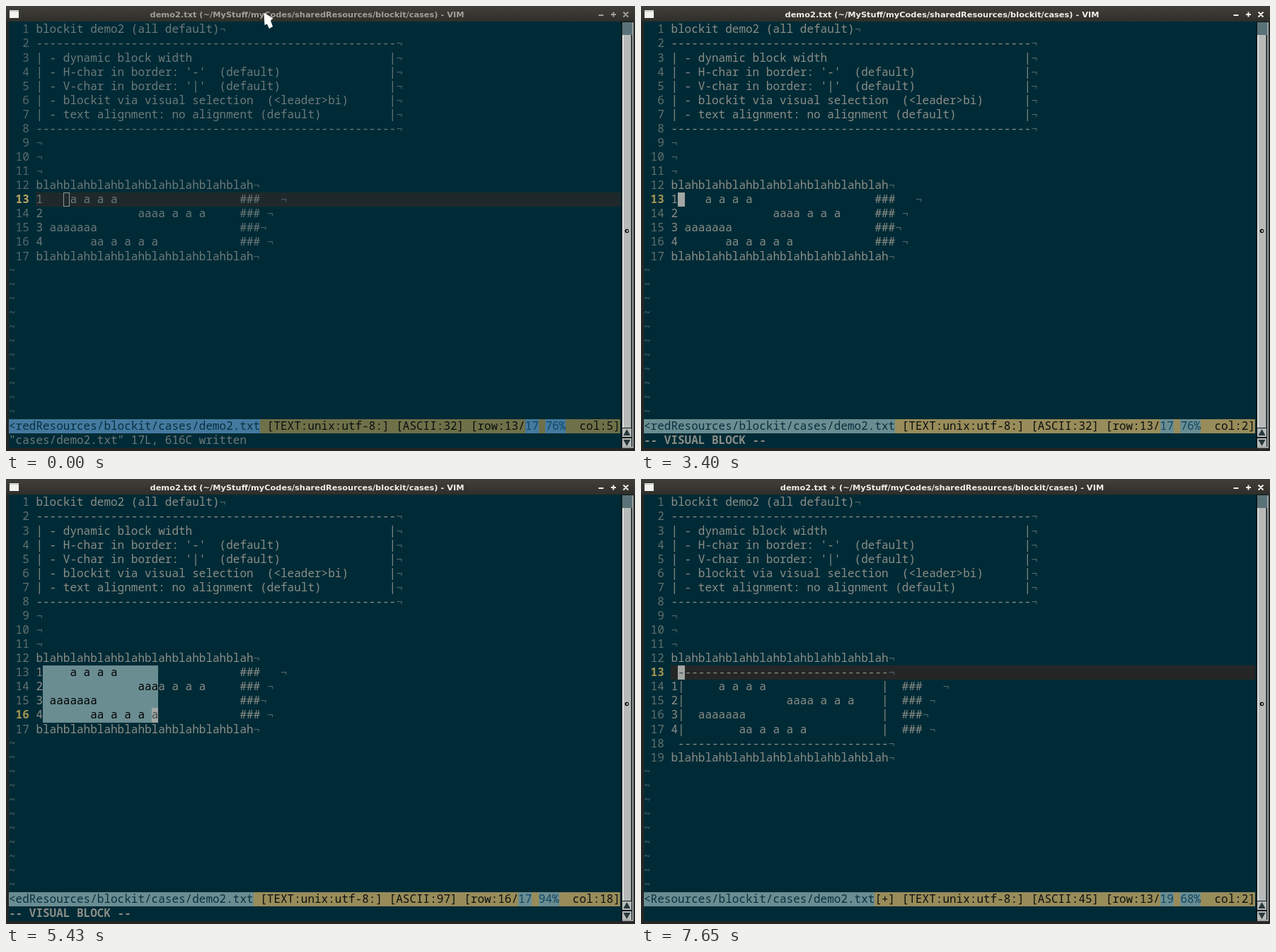
Write an HTML page that moves like this. It is 889 by 630 pixels and loops after 8 s.

```html
<!DOCTYPE html>
<html lang="en">
<head>
<meta charset="utf-8">
<title>Block drawing in Vim</title>
<style>
  html, body { margin: 0; width: 889px; height: 630px; overflow: hidden; background: #262624; }
  #win {
    --lit: 0%;
    --text: color-mix(in srgb, #8b8d87 var(--lit), #6c7a7b);
    --faint: color-mix(in srgb, #52666a var(--lit), #4a6065);
    --num: color-mix(in srgb, #61716f var(--lit), #56696d);
    --now: color-mix(in srgb, #a39553 var(--lit), #baa364);
    --line: color-mix(in srgb, #262626 var(--lit), #1f292c);
    --slate: color-mix(in srgb, #6a8d92 var(--lit), #447aa0);
    --olive: color-mix(in srgb, #988c5a var(--lit), #6e7148);
    --title: color-mix(in srgb, #f0eee8 var(--lit), #a09f99);
    position: relative; width: 889px; height: 630px; overflow: hidden;
  }
  #win div, #win svg { position: absolute; }
  #bar { left: 0; top: 0; width: 889px; height: 22px; background: linear-gradient(#403f3a, #2f2e2a); }
  #title {
    left: 0; top: 2px; width: 851px; text-align: center; white-space: pre; color: var(--title);
    font: bold 11.37px/20px "DejaVu Sans", sans-serif;
  }
  #screen {
    left: 4px; top: 22px; width: 865px; height: 604px; background: #002b36; color: var(--text);
    font: 16px/18px "Noto Sans Mono", monospace;
  }
  .row { left: 0; width: 864px; height: 20.07px; white-space: pre; }
  .row span { display: inline-block; height: 20.07px; vertical-align: top; }
  .hot { background: linear-gradient(90deg, transparent 38.4px, var(--line) 0); }
  .num, .now { color: var(--num); }
  .now { color: var(--now); font-weight: bold; }
  .eol, .tilde { color: var(--faint); }
  .sel { background: #6a8d92; color: #000; }
  .cur { background: #a3a7a4; color: #3c4a4d; }
  .box { box-shadow: inset 0 0 0 1px #8b9896; }
  .status { background: var(--olive); color: #0a0f0f; }
  .status .path, .status .pos { background: var(--slate); color: #07303e; }
  .status .pos { color: #0e4560; }
  .mode { font-weight: bold; }
</style>
</head>
<body>
<div id="win">
  <div id="bar"></div>
  <div id="title"></div>
  <div id="screen"></div>
  <svg width="889" height="630" viewBox="0 0 889 630">
    <defs>
      <pattern id="weave" width="2" height="2" patternUnits="userSpaceOnUse">
        <path d="M0 0h1v1H0zM1 1h1v1H1z" fill="#8fa0a2"/>
      </pattern>
    </defs>
    <rect x="5" y="6" width="13" height="11" fill="#f2f2ee"/>
    <path d="M5 7.5h13" stroke="#bdbdb8"/>
    <g fill="none" stroke="var(--title)" stroke-width="2">
      <path d="M837.5 13h7M855 12h7M858.5 8.5v7M872.5 8.5l7 7M879.5 8.5l-7 7"/>
    </g>
    <!-- sunken trough, raised thumb and arrows -->
    <rect x="869" y="22" width="18" height="604" fill="#0b1a1e"/>
    <path d="M886 23v602h-15" fill="none" stroke="#c9cccb" stroke-width="1.500"/>
    <rect x="871" y="23" width="14" height="18" fill="#24444d"/>
    <rect x="871" y="23" width="14" height="18" fill="url(#weave)"/>
    <rect x="871" y="41" width="13" height="556" fill="#b7bab8"/>
    <path d="M872 41v556" stroke="#dfe1df" stroke-width="2"/>
    <path d="M883.5 41v556" stroke="#5f6665"/>
    <circle cx="877.500" cy="318.500" r="2.800" fill="#000"/>
    <circle cx="878" cy="318.500" r="1.200" fill="#f4f4f4"/>
    <path d="M871 598h13v12h-13zM871 612h13v12h-13z" fill="#b7bab8"/>
    <path d="M877.500 599l5 9h-10zM877.500 623l5-9h-10z" fill="#27383c"/>
    <path id="pointer" d="M364.500 9.500L377.500 17.500L374 20.500L377 29L372 32L369 25.500L365.500 27z" fill="#fffdf6"/>
  </svg>
</div>
<script>
const LOOP = 8000, COLS = 90, PITCH = 20.07, STATUS = 29, COMMAND = 30;
const PATH = '~/MyStuff/myCodes/sharedResources/blockit/cases/demo2.txt';
const $ = id => document.getElementById(id);
const win = $('win'), title = $('title'), view = $('screen'), pointer = $('pointer');

// Lays pieces out at fixed columns: at(0, 'x', 5, 'y') gives "x    y".
const at = (...parts) => {
  let s = '';
  for (let i = 0; i < parts.length; i += 2) s = s.padEnd(parts[i]) + parts[i + 1];
  return s;
};
const framed = text => at(0, '| - ' + text, 52, '|');
const rule = '-'.repeat(53), blah = 'blah'.repeat(8), edge = ' ' + '-'.repeat(31);

const head = [
  'blockit demo2 (all default)', rule,
  framed('dynamic block width'),
  framed("H-char in border: '-'  (default)"),
  framed("V-char in border: '|'  (default)"),
  framed('blockit via visual selection  (<leader>bi)'),
  framed('text alignment: no alignment (default)'),
  rule, '', '', '', blah
];
const items = [[5, 'a a a a', 36], [15, 'aaaa a a a', 34], [2, 'aaaaaaa', 33], [8, 'aa a a a a', 34]];
const plain = [...head, ...items.map(([c, s, end], i) =>
  at(0, i + 1, c, s, 30, '###', end, '')), blah];
const boxed = [...head, edge, ...items.map(([c, s, end], i) =>
  at(0, i + 1 + '|', c + 2, s, 31, '|', 34, '###', end + 4, '')), edge, blah];

// [time, row, column]; columns between sweep keys advance one by one.
const moves = [[0, 13, 5], [1780, 13, 4], [1930, 13, 3], [3060, 13, 2],
  [3550, 14, 2], [3720, 15, 2], [4100, 16, 2], [4280, 16, 3],
  [4780, 16, 4], [5000, 16, 9], [5430, 16, 18], [5570, 16, 21],
  [5610, 16, 22], [5880, 16, 28], [7610, 13, 2]];

function caret(t) {
  const i = moves.findLastIndex(m => m[0] <= t);
  let [start, row, col] = moves[i];
  const next = moves[i + 1];
  if (next && next[1] === row && next[2] - col > 1)
    col += Math.floor((t - start) / (next[0] - start) * (next[2] - col) + 1e-6);
  return [row, col];
}

const esc = s => s.replace(/&/g, '&amp;').replace(/</g, '&lt;');
const span = (cls, s) => `<span class="${cls}">${esc(s)}</span>`;
const rowAt = (n, html, cls = '') =>
  `<div class="row ${cls}" style="top:${(1.4 + (n - 1) * PITCH).toFixed(2)}px">${html}</div>`;

function bufferRow(text, n, s) {
  const full = text + '¬';
  const kind = c => {
    if (n === s.row && c === s.col) return s.focus ? 'cur' : 'box';
    if (s.visual && n >= 13 && n <= s.row && c >= 2 && c <= s.col) return 'sel';
    return c === full.length ? 'eol' : 'txt';
  };
  const here = n === s.row;
  let html = span(here ? 'now' : 'num', String(n).padStart(3) + ' ');
  for (let c = 1; c <= full.length;) {
    const k = kind(c), from = c;
    while (c <= full.length && kind(c) === k) c++;
    html += span(k, full.slice(from - 1, c - 1));
  }
  return rowAt(n, html, here && !s.visual ? 'hot' : '');
}

function statusRow(lines, s) {
  const code = lines[s.row - 1].charCodeAt(s.col - 1), total = lines.length;
  const left = `${s.done ? '[+]' : ''} [TEXT:unix:utf-8:] [ASCII:${code}] [row:${s.row}/`;
  const share = Math.floor(s.row / total * 100) + '%';
  const right = `  col:${s.col}]`;
  const room = COLS - left.length - String(total).length - 1 - share.length - right.length;
  const html = span('path', '<' + PATH.slice(1 - room)) + span('', left) +
    span('pos', String(total)) + span('', ' ') + span('pos', share) + span('', right);
  return rowAt(STATUS, html, 'status');
}

function render(s) {
  const lines = s.done ? boxed : plain;
  let html = lines.map((text, i) => bufferRow(text, i + 1, s)).join('');
  for (let n = lines.length + 1; n < STATUS; n++) html += rowAt(n, '~', 'tilde');
  html += statusRow(lines, s);
  if (s.visual) html += rowAt(COMMAND, '-- VISUAL BLOCK --', 'mode');
  else if (!s.done) html += rowAt(COMMAND, '"cases/demo2.txt" 17L, 616C written');
  view.innerHTML = html;
  title.textContent = `demo2.txt ${s.named ? '+ ' : ''}(${PATH.slice(0, -10)}) - VIM`;
  pointer.style.display = s.focus ? 'none' : '';
  win.style.setProperty('--lit', s.lit * 20 + '%');
}

let shown = '';
function tick() {
  const t = performance.now() % LOOP;
  const [row, col] = caret(t);
  const state = {
    row, col,
    focus: t >= 490,
    lit: t < 490 ? 0 : Math.min(5, 1 + Math.floor((t - 490) / 62.5)),
    visual: t >= 3400 && t < 7610,
    done: t >= 7610,
    named: t >= 7650
  };
  const key = JSON.stringify(state);
  if (key !== shown) render(state);
  shown = key;
  requestAnimationFrame(tick);
}
tick();
</script>
</body>
</html>
```
